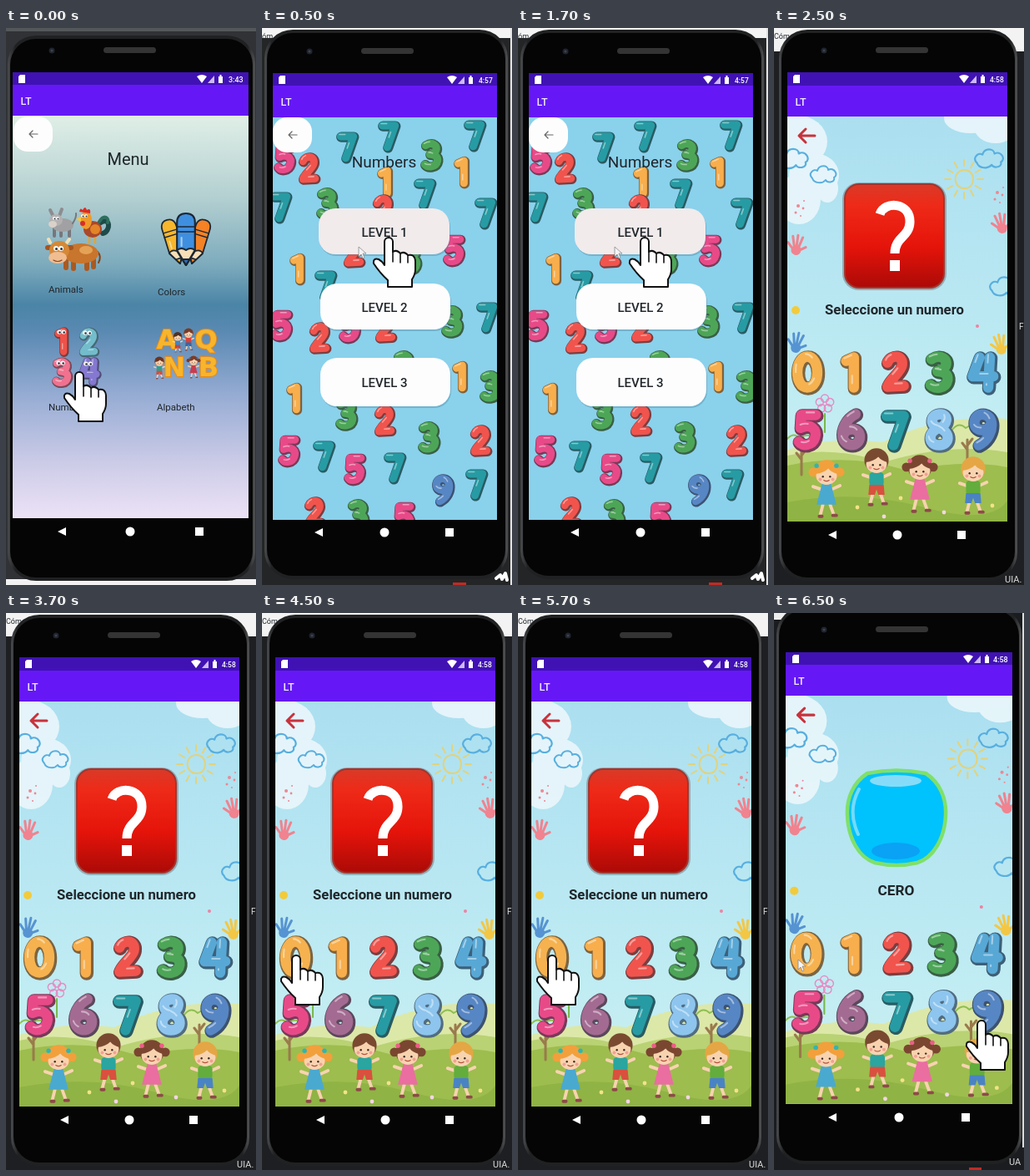
Animation of 300 by 667 pixels, one loop 8000 ms. Source, as an HTML page:

```html
<!DOCTYPE html>
<html lang="es">
<head>
<meta charset="utf-8">
<title>Learning app demo</title>
<style>
html, body { margin: 0; width: 100%; height: 100%; overflow: hidden; background: #1d1e20; }
svg { display: block; width: 100%; height: 100%; }
text { font-family: Roboto, Arial, sans-serif; fill: #20262b; }
.line { fill: none; stroke-linecap: round; stroke-linejoin: round; }
.scene { opacity: 0; animation: 8s step-end infinite; }
#menu { animation-name: menu; }
#levels { animation-name: levels; }
#ask { animation-name: ask; }
#tap { animation-name: tap; }
#zero { animation-name: zero; }
@keyframes menu { 0% { opacity: 1 } 6.25%, 100% { opacity: 0 } }
@keyframes levels { 0% { opacity: 0 } 6.25% { opacity: 1 } 31.25%, 100% { opacity: 0 } }
@keyframes ask { 0% { opacity: 0 } 31.25% { opacity: 1 } 81.25%, 100% { opacity: 0 } }
@keyframes tap { 0% { opacity: 0 } 56.25% { opacity: 1 } 81.25%, 100% { opacity: 0 } }
@keyframes zero { 0% { opacity: 0 } 81.25%, 100% { opacity: 1 } }
</style>
</head>
<body>
<svg id="stage" viewBox="0 0 300 667" preserveAspectRatio="none">
  <defs>
    <linearGradient id="dusk" x2="0" y2="1">
      <stop offset="0" stop-color="#e0efe7"/><stop offset=".2" stop-color="#b4d0d1"/>
      <stop offset=".37" stop-color="#7dabbd"/><stop offset=".47" stop-color="#4a84a6"/>
      <stop offset=".54" stop-color="#5b8ab3"/><stop offset=".7" stop-color="#98add4"/>
      <stop offset=".86" stop-color="#cbcbe7"/><stop offset="1" stop-color="#ece2f6"/>
    </linearGradient>
    <linearGradient id="sky" x2="0" y2="1">
      <stop offset="0" stop-color="#abdff0"/><stop offset=".7" stop-color="#c0ecf3"/><stop offset="1" stop-color="#cdf0ee"/>
    </linearGradient>
    <linearGradient id="red" x2="0" y2="1">
      <stop offset="0" stop-color="#d93a28"/><stop offset=".2" stop-color="#ee2a18"/>
      <stop offset=".6" stop-color="#e5140a"/><stop offset="1" stop-color="#ab0a07"/>
    </linearGradient>
    <linearGradient id="metal" x2="1" y2="0">
      <stop offset="0" stop-color="#4a4b4d"/><stop offset=".03" stop-color="#202122"/>
      <stop offset=".97" stop-color="#202122"/><stop offset="1" stop-color="#515254"/>
    </linearGradient>
  </defs>
</svg>
<script>
const rect = (x, y, w, h, fill, r = 0, more = '') =>
  `<rect x="${x}" y="${y}" width="${w}" height="${h}" rx="${r}" fill="${fill}" ${more}/>`;
const oval = (x, y, rx, ry, fill, more = '') =>
  `<ellipse cx="${x}" cy="${y}" rx="${rx}" ry="${ry}" fill="${fill}" ${more}/>`;
const dot = (x, y, r, fill, more) => oval(x, y, r, r, fill, more);
const shape = (d, fill, more = '') => `<path d="${d}" fill="${fill}" ${more}/>`;
const line = (d, color, w, more = '') =>
  `<path class="line" d="${d}" stroke="${color}" stroke-width="${w}" ${more}/>`;
const text = (x, y, size, str, more = '') => `<text x="${x}" y="${y}" font-size="${size}" ${more}>${str}</text>`;
const at = (x, y, body, more = '') => `<g transform="translate(${x} ${y}) ${more}">${body}</g>`;
const mid = 'text-anchor="middle"';

// Bubble digits, drawn around their centre
const loop6 = 'M5-18C-7-12-11 0-10 8C-8 21 10 21 10 8C10-3-6-3-9 6';
const digits = [
  'M0-18C15-18 16 18 0 18C-16 18-15-18 0-18Z',
  'M-6-13L3-17V18',
  'M-9-11C-5-21 10-20 8-8C7 0-8 10-9 17L10 16',
  'M-9-15C2-22 12-14 7-6Q4-1-2-1Q11 0 10 9C8 20-6 20-10 15',
  'M-4-17L-12 5H12M8-17L6 18',
  'M10-17H-7L-8-2C4-8 12 0 9 9C6 19-6 20-10 14',
  loop6,
  'M-10-16H10L-2 18',
  'M0-2C-12-5-10-18 1-18C12-18 10-4 0-2C-14 3-13 18 0 18C13 18 14 3 0-2',
  loop6
];
const hues = ['#f6b24f', '#f8ae4c', '#f1544d', '#4da657', '#58a8d6', '#e84a88', '#a46b92', '#279ba3', '#8dc5ee', '#5786c4'];

function digit(n, x, y, s = 1, c = hues[n]) {
  const d = digits[n], flip = n === 9 ? 'rotate(180)' : '';
  return at(x, y,
    line(d, '', 16, `style="stroke:color-mix(in srgb, ${c} 40%, #2b3038)" transform="translate(1 1) ${flip}"`) +
    line(d, c, 12, `transform="${flip}"`) +
    line(d, '#fff', 2, `opacity=".45" stroke-dasharray="9 25" transform="translate(-2 -3) ${flip}"`),
    `scale(${s})`);
}

const hand = (x, y) => at(x, y,
  shape('M-5 5A5 5 0 0 1 5 5V17Q10 14 14 19Q19 16 23 21Q31 19 32 28V38Q32 44 28 50V59H-1V51Q-10 43-18 31Q-19 24-12 26Q-8 28-5 33Z',
    '#fff', 'stroke="#111" stroke-width="2" stroke-linejoin="round"') +
  line('M5 17V29M14 19V30M23 21V30', '#111', 1.6));

const cursor = (x, y) => at(x, y,
  shape('M0 0V12L3 9L5 14L7 13L5 8H9Z', '#f4f4f4', 'stroke="#8a8a8a" stroke-width=".8"'));

function phone(p) {
  const { l, r, status, bar, top, end, sd, wifi, nav } = p, w = r - l, sy = status + 8;
  return rect(p.body[0], p.body[1], p.body[2], p.body[3], 'url(#metal)', 34) +
    rect(p.body[0] + 3, p.body[1] + 4, p.body[2] - 6, p.body[3] - 8, '#050505', 31) +
    dot(p.cam[0], p.cam[1], 3.5, '#20242d') + dot(p.cam[0], p.cam[1], 1.5, '#3b4352') +
    rect(p.cam[0] + 62, p.cam[1] - 4, 63, 7, '#343434', 3.5) +
    rect(l, status, w, bar - status, '#4012b4') +
    rect(l, bar, w, top - bar, '#6518f5') +
    text(l + 9.5, (bar + top) / 2 + 5, 12.5, 'LT', 'style="fill:#efe8ff" font-weight="500"') +
    shape(`M${sd + 2} ${sy - 5}h6v10h-8v-8z`, '#fff') +
    shape(`M${wifi} ${sy - 3}q6-4 12 0l-6 8z`, '#fff') +
    shape(`M${wifi + 21} ${sy - 4}v9h-8z`, '#cdb9f5') +
    shape(`M${wifi + 26} ${sy - 3}h1.5v-2h2v2h1.5v8h-5z`, '#fff') +
    text(p.clock, sy + 4, p.clockSize, p.time, 'style="fill:#fff" font-weight="500"') +
    shape(`M${nav[0] - 5} ${p.navY}l10-5v10z`, '#fff') + dot(nav[1], p.navY, 5.5, '#fff') +
    rect(nav[2] - 5, p.navY - 5, 10, 10, '#fff') +
    rect(l, top, w, end - top, p.fill);
}

const backButton = (x, y) =>
  rect(x, y, 47, 42, '#fdfdfd', 17) +
  line(`M${x + 29} ${y + 21}h-10m4-4l-4 4l4 4`, '#666', 1.2);

// Menu icons
const eyes = (x, y, r = 2.6) => [0, r * 2].map(d => dot(x + d, y, r, '#fff') + dot(x + d + .5, y + .5, r / 2, '#27303a')).join('');

const animals =
  // donkey
  line('M58 240v9M66 240v9M76 240v9', '#77777c', 4) + oval(68, 236, 13, 8, '#a1a0a2') +
  line('M57 226l-4-8M64 225l3-8', '#8d8c90', 4) + oval(60, 230, 8, 7, '#b3b1b2') +
  oval(56, 235, 5, 4, '#dad2ca') + eyes(58, 228, 2) + line('M80 234q5-8 4-12', '#77777c', 2) +
  // rooster
  line('M112 234C126 224 126 244 116 246', '#1e4a4a', 6) + line('M112 232C118 222 124 228 122 233', '#2e705e', 4) +
  line('M100 249v8M107 249v8', '#e8a22c', 2.5) + oval(104, 241, 11, 10, '#a9482b') + oval(107, 241, 6, 6, '#e38428') +
  oval(96, 230, 7, 11, '#ef9a2c') + shape('M88 220q1-6 4-2q3-6 5 0q5-3 4 4z', '#dd2b23') +
  shape('M90 226l-6 3l6 3z', '#f5c73b') + dot(92, 234, 3, '#d92e25') + eyes(92, 225, 2) +
  // cow
  line('M72 278v9M81 279v9M97 279v9M105 277v9', '#a95a22', 6) + line('M110 268q5 6 1 13', '#874018', 2) +
  oval(90, 270, 21, 12, '#c8752d') + oval(96, 266, 8, 5, '#e4a257') +
  line('M53 257l-2-4M73 257l3-4', '#f0dfb6', 4) + line('M50 263h28', '#a65520', 6) +
  oval(64, 266, 12, 11, '#d58938') + oval(62, 275, 11, 7, '#f0bd91') + eyes(60, 264, 3) +
  line('M57 278q5 3 10 0', '#8b4423', 1.2);

const crayon = (x, y, c, tip, more) => at(x, y,
  `<g stroke="#1c2733" stroke-width="2" stroke-linejoin="round">` +
  shape('M-10-20Q-10-31 0-31Q10-31 10-20V14L0 31L-10 14Z', c) +
  shape('M-10 13Q-5 9 0 13Q5 9 10 13L0 31Z', '#f8dfb7') + shape('M-4 24H4L0 31Z', tip) +
  line('M-10-15H10M-10-9H10', '#1c2733', 1.6) + '</g>' +
  line('M-5-2V8', '#fff', 2, 'opacity=".55"'), more);

const colors = crayon(201, 256, '#f7b62c', '#f7b62c', 'rotate(-17) scale(.88)') +
  crayon(231, 256, '#f58225', '#f58225', 'rotate(17) scale(.88)') +
  crayon(216, 253, '#3f8fe0', '#2b6fc0', 'scale(1.08 1)');

const numbers = digit(1, 67, 375, .7, '#ef5148') + digit(2, 99, 376, .7, '#73bccb') +
  digit(3, 67, 412, .7, '#f0728f') + digit(4, 100, 411, .7, '#8478d0') +
  eyes(64, 364) + eyes(95, 365) + eyes(63, 401) + eyes(96, 402);

const letter = (x, y, ch) => text(x, y, 32, ch,
  `${mid} font-weight="800" style="font-family:'DejaVu Sans',sans-serif;fill:#f7b52c;stroke:#e88a1a;stroke-width:2;paint-order:stroke"`);

// Children: origin is the middle of the head
function kid(x, y, hair, shirt, pants, girl, s = 1.08) {
  const skin = '#f8d3b0';
  return at(x, y,
    line('M-4 34L-7 46M4 34L8 45', skin, 3.5) + line('M-8 47h3M7 46h4', '#8d4a48', 3.5) +
    line('M-6 17L-15 14M6 17L15 13', skin, 3.5) +
    (girl ? dot(-15, -2, 5, hair) + dot(15, -2, 5, hair) + shape('M-5 11H5L11 34H-11Z', shirt)
          : rect(-8, 11, 16, 16, shirt, 4) + shape('M-8 25H8L9 36H2L0 30L-2 36H-9Z', pants)) +
    dot(0, -2, 13.5, hair) + oval(0, 2, 11.5, 10, skin) +
    shape('M-12 0Q-10-12 0-13Q10-12 12 0Q5-2 2-6Q-3-1-12 0Z', hair) +
    (girl ? dot(-11, -9, 2.5, pants) + dot(11, -9, 2.5, pants) : '') +
    dot(-4, 3, 1.1, '#3a2a24') + dot(4, 3, 1.1, '#3a2a24') + line('M-3 7q3 2 6 0', '#b5503f', 1) +
    dot(-7, 6, 1.8, '#f3a092') + dot(7, 6, 1.8, '#f3a092'), `scale(${s})`);
}

const alphabet = letter(193, 384, 'A') + letter(240, 384, 'Q') + letter(202, 417, 'N') + letter(243, 417, 'B') +
  kid(206, 370, '#503024', '#3a88c8', '#c8423b', 0, .38) + kid(219, 366, '#7a3b24', '#d8423b', '#2f68aa', 0, .42) +
  kid(184, 400, '#6b3422', '#2e9e8f', '#d84c38', 0, .42) + kid(225, 399, '#803a24', '#c83c4c', '#3977b6', 1, .42);

const menu = rect(0, 0, 300, 667, '#303236') + rect(0, 0, 300, 4, '#55585b') + rect(0, 660, 300, 7, '#f2f2f2') +
  phone({ body: [2, 9, 297, 653], cam: [55, 27], l: 8, r: 291, status: 53, bar: 68, top: 105, end: 587,
    sd: 15, wifi: 229, clock: 267, clockSize: 9, time: '3:43', nav: [67, 149, 232], navY: 603, fill: 'url(#dusk)' }) +
  backButton(9, 106) + text(146.5, 164, 20, 'Menu', mid) +
  animals + colors + numbers + alphabet +
  text(51, 317, 11.5, 'Animals') + text(182, 320, 11.5, 'Colors') +
  text(51, 458, 11.5, 'Numbers') + text(181, 458, 11.5, 'Alpabeth') + hand(88, 412);

// Wallpaper: digit, x, y
const scatter = [
  7,102,142, 7,152,129, 7,255,128, 5,27,156, 2,56,168, 3,203,152, 1,240,172, 1,148,184, 7,195,198,
  7,22,214, 3,78,210, 7,268,221, 2,145,218, 5,230,266, 1,43,288, 7,76,308, 2,110,268, 3,178,276,
  5,23,356, 2,69,371, 5,105,358, 2,148,358, 3,228,351, 7,270,346, 3,170,405, 1,238,417, 3,274,429,
  1,39,443, 3,101,462, 2,147,470, 5,32,506, 7,74,512, 5,111,528, 7,159,526, 3,200,490, 2,262,494,
  9,217,553, 7,257,546, 2,63,580, 3,115,583, 5,170,586
];
let wallpaper = '';
for (let i = 0; i < scatter.length; i += 3)
  wallpaper += digit(scatter[i], scatter[i + 1], scatter[i + 2], .76);

const level = (n, x, y, w, h, fill) =>
  rect(x + 1, y + 2, w, h, '#4b7f96', 20, 'opacity=".35"') + rect(x, y, w, h, fill, 20) +
  text(147, y + h / 2 + 6, 15, 'LEVEL ' + n, mid + ' font-weight="500"');

const levels = rect(0, 0, 300, 667, '#242527') + rect(0, 0, 300, 12, '#f4f4f4') + rect(298, 0, 2, 667, '#e4e4e4') +
  text(0, 13, 9, 'óm') +
  phone({ body: [3, 2, 292, 658], cam: [57, 28], l: 13, r: 282, status: 54, bar: 69, top: 107, end: 589,
    sd: 20, wifi: 222, clock: 260, clockSize: 8.5, time: '4:57', nav: [68, 147, 225], navY: 604, fill: '#8ad1ec' }) +
  `<clipPath id="wall">${rect(13, 107, 269, 482, '#000')}</clipPath><g clip-path="url(#wall)">${wallpaper}</g>` +
  backButton(13, 107) + text(146.5, 167, 19, 'Numbers', mid) +
  level(1, 68, 216, 157, 55, '#f1ebec') + level(2, 70, 306, 156, 55, '#fdfdfd') + level(3, 70, 395, 156, 58, '#fdfdfd') +
  cursor(116, 262) + hand(152, 251) +
  line('M281 659l5-4l2 5l4-7l2 8', '#fff', 4) + rect(229, 664, 16, 3, '#c22a24');

// Playground
const cloud = (x, y, s) => at(x, y,
  line('M-14 6C-20 0-12-6-8-3C-6-11 5-10 5-4C12-8 18 2 12 5C14 11 4 12 2 8C-2 13-12 12-14 6Z', '#58afdf', 2), `scale(${s})`);
const print = (x, y, c, a) => at(x, y, oval(0, 4, 6, 6, c) +
  line('M-5 2L-11-4M-3-1L-6-12M0-2V-14M3-1L6-12M5 3L11-1', c, 3), `rotate(${a})`);
const spray = (x, y, c) => [[0, 0, 2], [6, 3, 1.4], [-3, 8, 1.5], [7, -6, 1], [3, 12, 1]]
  .map(([a, b, r]) => dot(x + a, y + b, r, c)).join('');
const rays = Array.from({ length: 12 }, (_, i) =>
  line('M0-16V-23', '#e3d27a', 2, `transform="rotate(${i * 30})"`)).join('');
const tree = (x, y) => line(`M${x} ${y}v-30m0 12l-6-8m6 3l6-8`, '#9a7a4c', 3) +
  line(`M${x - 18} ${y - 42}q8-10 16-2q10-8 18 3`, '#8fbf52', 2);
const petals = Array.from({ length: 5 }, (_, i) =>
  `<circle class="line" cy="-6.5" r="4.5" stroke="#e58bc4" stroke-width="1.5" transform="rotate(${i * 72})"/>`).join('');

const playground = `<clipPath id="yard">${rect(16, 106, 264, 485, '#000')}</clipPath><g clip-path="url(#yard)">` +
  rect(16, 106, 264, 485, 'url(#sky)') +
  '<g opacity=".85">' + oval(26, 136, 38, 32, '#eef8fc') + oval(48, 176, 30, 26, '#eef8fc') + oval(30, 205, 26, 30, '#eef8fc') +
  oval(64, 192, 13, 17, '#eef8fc') + oval(236, 108, 32, 18, '#eef8fc') + oval(266, 118, 26, 20, '#eef8fc') + '</g>' +
  cloud(24, 155, 1.15) + cloud(60, 174, 1) + cloud(259, 155, 1.1) + cloud(277, 308, 1.1) +
  at(228, 181, line('M0-11C14-12 15 11 1 11C-14 11-14-10 0-11Z', '#e3d27a', 2) + rays) +
  print(27, 262, '#f0838f', 8) + spray(29, 213, '#ee8794') + print(273, 236, '#f0838f', -10) + spray(268, 197, '#ee8794') +
  print(27, 379, '#5693d2', 12) + print(272, 381, '#f3c745', -10) + dot(26, 338, 5, '#f2cb3c') +
  dot(244, 357, 2, '#ec83a2') +
  shape('M16 505Q70 488 130 496Q200 462 280 468V591H16Z', '#dce8a8') +
  shape('M16 512Q70 500 132 520Q210 496 280 508V591H16Z', '#b9d274') +
  shape('M16 524Q90 508 160 530Q230 516 280 526V591H16Z', '#9dbd4e') +
  shape('M16 568Q100 552 180 574T280 566V591H16Z', '#8fb344') +
  tree(33, 535) + tree(232, 523) + at(61, 450, petals + line('M0 12v22', '#79b84d', 2)) +
  [[100, 574], [132, 585], [152, 563], [204, 580], [262, 572]].map(([x, y], i) => dot(x, y, 2.4, i % 2 ? '#f2d6e4' : '#f3e28a')).join('') +
  kid(63, 534, '#f2a03c', '#4aa9cf', '#35b3ae', 1) + kid(123, 520, '#7a4a30', '#2aa5a0', '#d9503f', 0) +
  kid(175, 528, '#7b4630', '#ea6ea0', '#ec5d86', 1) + kid(239, 530, '#e5a645', '#62ad3c', '#4a83c4', 0) +
  '</g>' + line('M49 129H30M38 121L30 129L38 137', '#c8323c', 3) +
  digits.map((_, i) => digit(i, 40 + 52.7 * (i % 5), i < 5 ? 412 : 481, 1.03)).join('');

const question = rect(82, 185, 125, 129, '#5f6b70', 20, 'opacity=".45"') +
  rect(85, 187, 119, 124, 'url(#red)', 17, 'stroke="#a3352d" stroke-width="2"') +
  line('M127 223C132 207 164 208 163 233C162 251 145 250 145 270', '#fff', 11, 'style="stroke-linecap:butt"') +
  rect(139, 278, 12, 13, '#fff');

const ask = rect(0, 0, 300, 667, '#1e1f22') + rect(0, 0, 300, 28, '#f3f3f3') + text(0, 13, 9, 'Cóm') +
  phone({ body: [6, 2, 286, 660], cam: [60, 27], l: 16, r: 280, status: 53, bar: 69, top: 106, end: 591,
    sd: 23, wifi: 222, clock: 259, clockSize: 8.5, time: '4:58', nav: [70, 148, 225], navY: 607, fill: '#b5e4f1' }) +
  playground + question + text(144.5, 343, 16.7, 'Seleccione un numero', mid + ' font-weight="700"') +
  text(294, 361, 10, 'F', 'style="fill:#ddd"') + text(277, 664, 11, 'UIA.', 'style="fill:#ddd"');

const bowl = shape('M112 192Q147 185 182 192C199 203 207 222 206 242C205 270 191 293 172 299Q147 305 121 299C102 293 89 270 88 242C87 222 95 203 112 192Z',
    '#00c2fd', 'stroke="#7fe06a" stroke-width="4.5"') +
  oval(146, 201, 31, 7, '#86dcf8') + oval(146, 285, 29, 10, '#0aa2f4') +
  line('M102 211C92 229 93 248 101 265', '#73dbfb', 4);

const zero = rect(0, 0, 300, 667, '#1b1c1f') + rect(0, 0, 16, 8, '#eee') + rect(298, 0, 2, 640, '#ddd') +
  phone({ body: [3, -8, 294, 668], cam: [60, 20], l: 14, r: 286, status: 47, bar: 62, top: 99, end: 588,
    sd: 22, wifi: 227, clock: 263, clockSize: 9, time: '4:58', nav: [70, 150, 230], navY: 604, fill: '#b5e4f1' }) +
  `<g transform="matrix(1.03 0 0 1.008 -2.5 -7.9)">${playground}</g>` +
  bowl + text(146.5, 338, 17.3, 'CERO', mid + ' font-weight="700"') +
  cursor(29, 415) + hand(249, 488) +
  text(282, 661, 11, 'UA', 'style="fill:#ddd"') + rect(234, 664, 15, 3, '#c22a24');

const scenes = { menu, levels, ask, tap: hand(41, 410), zero };
document.getElementById('stage').insertAdjacentHTML('beforeend',
  Object.entries(scenes).map(([id, body]) => `<g class="scene" id="${id}">${body}</g>`).join(''));
</script>
</body>
</html>
```
